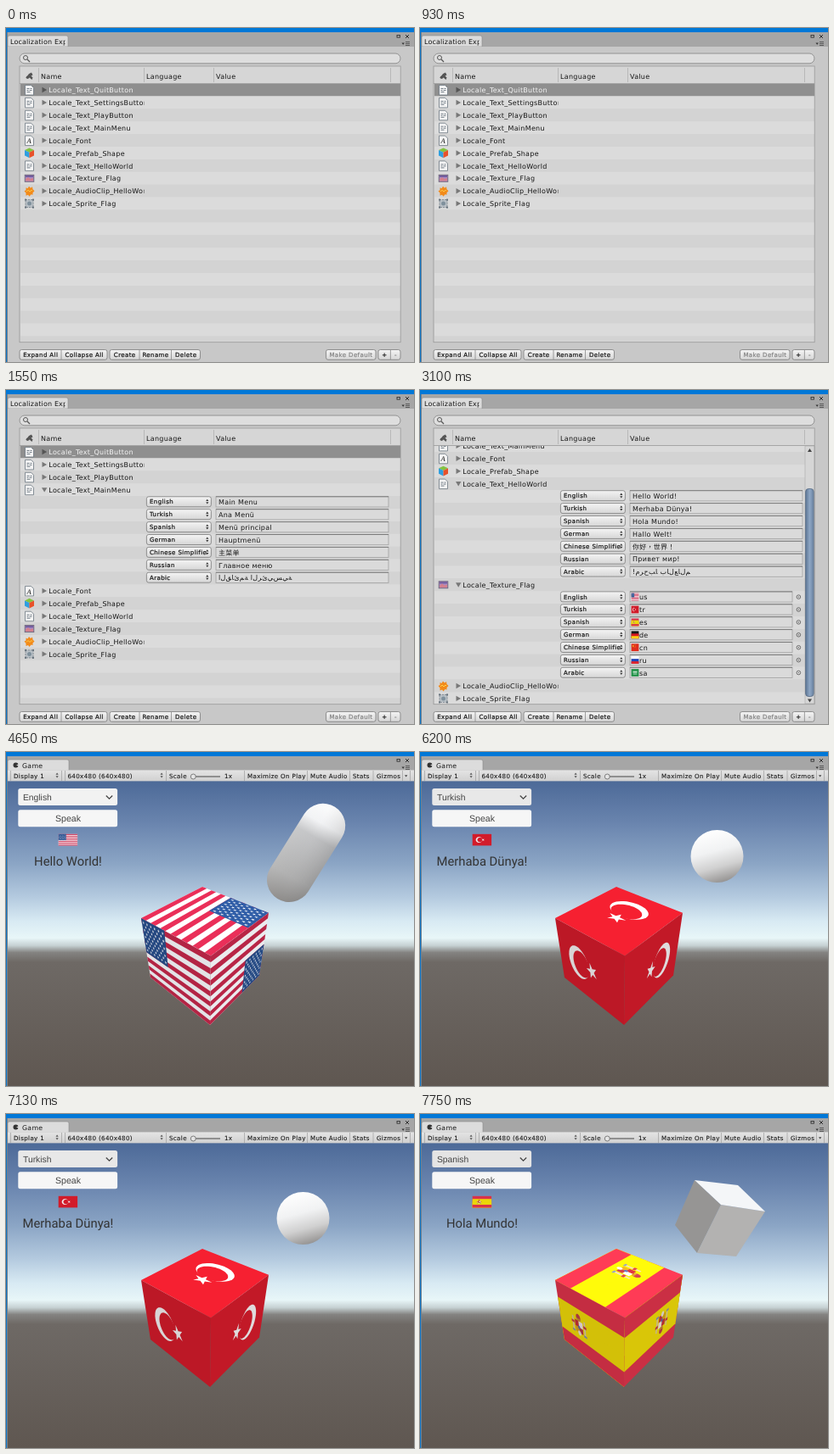
Animation, 480 px wide and 394 px high, one loop 9300 ms. Source, as an HTML page:

```html
<!DOCTYPE html>
<html lang="en">
<head>
<meta charset="utf-8">
<title>Localization</title>
<style>
html, body { margin: 0; width: 100%; height: 100%; overflow: hidden; background: #c6c6c6; }
svg { display: block; }
text { font-family: "DejaVu Sans", "Noto Sans CJK TC", "Noto Sans CJK", sans-serif; fill: #161616; letter-spacing: .28px; text-rendering: geometricPrecision; white-space: pre; }
.mini { letter-spacing: .4px; stroke: #161616; stroke-width: .22px; }
.off { fill: #858585; stroke: #858585; }
.bar { letter-spacing: .36px; stroke: #161616; stroke-width: .1px; }
.ui { font-family: "Liberation Sans", Arial, sans-serif; fill: #444; letter-spacing: 0; }
.big { font-family: Roboto, sans-serif; fill: #333; letter-spacing: 0; }
.ltr { direction: ltr; unicode-bidi: bidi-override; }
</style>
</head>
<body>
<svg id="stage" width="480" height="394" viewBox="0 0 480 394">
<defs>
  <linearGradient id="btn" x2="0" y2="1"><stop stop-color="#f4f4f4"/><stop offset="1" stop-color="#d6d6d6"/></linearGradient>
  <linearGradient id="bar" x2="0" y2="1"><stop stop-color="#e4e4e4"/><stop offset="1" stop-color="#d0d0d0"/></linearGradient>
  <linearGradient id="thumb"><stop stop-color="#5c7594"/><stop offset=".5" stop-color="#8ea6c4"/><stop offset="1" stop-color="#6b84a3"/></linearGradient>
  <linearGradient id="sky" gradientUnits="userSpaceOnUse" x1="0" y1="35" x2="0" y2="393">
    <stop stop-color="#4d6a98"/><stop offset=".13" stop-color="#6883ad"/><stop offset=".27" stop-color="#8ba5c5"/>
    <stop offset=".38" stop-color="#b4cadf"/><stop offset=".46" stop-color="#d8eaf3"/><stop offset=".515" stop-color="#e8f6f8"/>
    <stop offset=".54" stop-color="#c6d1d3"/><stop offset=".563" stop-color="#848381"/><stop offset=".595" stop-color="#6e6965"/>
    <stop offset="1" stop-color="#5f5751"/>
  </linearGradient>
  <linearGradient id="capLen" gradientUnits="userSpaceOnUse" x1="386" y1="62" x2="320" y2="176">
    <stop stop-color="#fdfdfd"/><stop offset=".2" stop-color="#f0f1f3"/><stop offset=".34" stop-color="#bcbdbf"/>
    <stop offset=".75" stop-color="#a6a6a6"/><stop offset="1" stop-color="#817f7d"/>
  </linearGradient>
  <linearGradient id="capSide" gradientUnits="userSpaceOnUse" x1="330" y1="106" x2="376" y2="132">
    <stop stop-color="#fff" stop-opacity=".2"/><stop offset=".45" stop-color="#fff" stop-opacity=".1"/>
    <stop offset="1" stop-color="#444" stop-opacity=".16"/>
  </linearGradient>
  <linearGradient id="ball" x1=".35" y1="0" x2=".62" y2="1">
    <stop stop-color="#fff"/><stop offset=".4" stop-color="#f1f2f3"/><stop offset=".7" stop-color="#d0d0d0"/><stop offset="1" stop-color="#939190"/>
  </linearGradient>
  <clipPath id="rows"><rect x="17" y="66" width="447" height="304"/></clipPath>
  <clipPath id="names"><rect x="17" y="66" width="145.5" height="304"/></clipPath>
  <clipPath id="tab"><rect x="2" y="8" width="67.6" height="14"/></clipPath>
</defs>
</svg>
<script>
const HOLD = 1550, ROW = 14.9;

const rect = (x, y, w, h, fill, more = '') =>
  `<rect x="${x}" y="${y}" width="${w}" height="${h}" fill="${fill}" ${more}/>`;
const text = (x, y, size, str, more = '') =>
  `<text x="${x}" y="${y}" font-size="${size}" ${more}>${str}</text>`;
const path = (d, fill, more = '') => `<path d="${d}" fill="${fill}" ${more}/>`;
const line = (d, color, w = 1) => path(d, 'none', `stroke="${color}" stroke-width="${w}"`);
const poly = (pts, fill, map = p => p) =>
  `<polygon points="${pts.map(p => map(p).map(n => n.toFixed(2)).join()).join(' ')}" fill="${fill}"/>`;
const mid = 'text-anchor="middle"';

// Flags in unit coordinates, placed through a mapping
const box = (u, v, w, h) => [[u, v], [u + w, v], [u + w, v + h], [u, v + h]];
const around = (n, u, v, radius, turn = 0) => Array.from({ length: n }, (_, i) => {
  const a = turn + i * 2 * Math.PI / n, r = radius(i);
  return [u + r * Math.cos(a) / 1.5, v + r * Math.sin(a)];
});
const disc = (u, v, r) => around(40, u, v, () => r);
const star = (u, v, r, turn = -Math.PI / 2) => around(10, u, v, i => i % 2 ? r * .382 : r, turn);
const bands = (...colors) => colors.map((c, i) => [box(0, i / colors.length, 1, 1 - i / colors.length), c]);

function usFlag() {
  const out = [[box(0, 0, 1, 1), '#f2f2f5']];
  for (let i = 0; i < 13; i += 2) out.push([box(0, i / 13, 1, 1 / 13), '#be2648']);
  out.push([box(0, 0, .4, 7 / 13), '#264c88']);
  for (let r = 0; r < 9; r++)
    for (let c = 0; c < 6 - r % 2; c++)
      out.push([star(.4 * (2 * c + 1 + r % 2) / 12, 7 / 13 * (r + 1) / 10, .028), '#f2f2f5']);
  return out;
}

const flags = {
  us: usFlag(),
  tr: [[box(0, 0, 1, 1), '#c81a28'], [disc(.345, .5, .25), '#e6e2e3'], [disc(.39, .5, .2), '#c81a28'],
    [star(.56, .5, .125, Math.PI), '#e6e2e3']],
  es: [...bands('#d03046', '#e0cc08', '#e0cc08', '#d03046'),
    [box(.24, .4, .025, .22), '#c9b9a0'], [box(.435, .4, .025, .22), '#c9b9a0'],
    [box(.225, .47, .05, .04), '#b83840'], [box(.425, .47, .05, .04), '#b83840'],
    [box(.225, .62, .05, .03), '#7b83a8'], [box(.425, .62, .05, .03), '#7b83a8'],
    [disc(.35, .385, .055), '#b03a42'], [box(.315, .4, .07, .03), '#b98a28'],
    [box(.285, .44, .065, .1), '#b82d36'], [box(.35, .44, .065, .1), '#dfd2d4'],
    [box(.285, .54, .065, .09), '#c8961c'], [box(.35, .54, .065, .09), '#b0343e'],
    [disc(.35, .635, .04), '#d8cfc8'], [disc(.35, .54, .028), '#5560a0']],
  de: bands('#151515', '#d0151c', '#f0c810'),
  cn: [[box(0, 0, 1, 1), '#d42a1c'], [star(.25, .32, .2), '#f0d020'], [disc(.5, .15, .05), '#f0d020'],
    [disc(.58, .32, .05), '#f0d020'], [disc(.5, .5, .05), '#f0d020']],
  ru: bands('#f6f6f6', '#1c40b0', '#d0242c'),
  sa: [[box(0, 0, 1, 1), '#1f8a45'], [box(.22, .3, .56, .2), '#b9dcc4'], [box(.25, .63, .5, .08), '#e4f2e8']]
};
const lit = (hex, light) => `rgb(${hex.match(/\w\w/g).map(c => Math.min(255, Math.round(parseInt(c, 16) * light)))})`;
const flag = (code, map, light = 1.05) =>
  flags[code].map(([pts, fill]) => poly(pts, lit(fill, light), map)).join('');
const flat = (x, y, w, h) => ([u, v]) => [x + u * w, y + v * h];

// Projective map from the unit square to four corners
function project([[x0, y0], [x1, y1], [x2, y2], [x3, y3]]) {
  const ax = x1 - x2, ay = y1 - y2, bx = x3 - x2, by = y3 - y2;
  const sx = x0 - x1 + x2 - x3, sy = y0 - y1 + y2 - y3, det = ax * by - bx * ay;
  const g = (sx * by - bx * sy) / det, h = (ax * sy - sx * ay) / det;
  return ([u, v]) => {
    const w = g * u + h * v + 1;
    return [((x1 - x0 + g * x1) * u + (x3 - x0 + h * x3) * v + x0) / w,
            ((y1 - y0 + g * y1) * u + (y3 - y0 + h * y3) * v + y0) / w];
  };
}

// Editor window
const frame = () =>
  rect(0, 0, 480, 394, '#c6c6c6') + rect(0, 0, 480, 22, '#a6a6a6') +
  rect(0, 0, 480, 5, '#0078d7') + rect(0, 5, 1, 389, '#0f74c4') + rect(1, 5, 1, 389, '#71818f') +
  rect(460, 8.5, 3.4, 2.6, 'none', 'stroke="#333" stroke-width=".9"') +
  line('M470 8l4 4m0-4l-4 4', '#333') + path('M465.5 17.5h3.4l-1.7 2.2z', '#333') +
  line('M470 16.5h5m-5 2h5m-5 2h5', '#444', .8);
const tabShape = w => path(`M2 22V11q0-2 2-2h${w - 5}q2 0 2 2v11z`, '#dcdcdc', 'stroke="#8a8a8a" stroke-width=".6"');

// Joined buttons: [label, width] pairs in one rounded frame
function buttons(x, list) {
  const width = list.reduce((sum, [, w]) => sum + w, 0);
  let out = rect(x, 379.5, width, 11.8, 'url(#btn)', 'rx="2.4" stroke="#7c7c7c" stroke-width=".8"');
  list.forEach(([label, w, off], i) => {
    if (i) out += line(`M${x} 380v11`, '#8a8a8a', .8);
    out += text(x + w / 2 + .2, 388, 7, label, `class="mini ${off ? 'off' : ''}" ${mid}`);
    x += w;
  });
  return out;
}

const page = (x, y) => path(`M${x} ${y - 5.5}h7l3 3v8.5h-10z`, '#f4f4f4', 'stroke="#6b7680" stroke-width=".8"');
const icons = {
  text: y => page(22.5, y) + line(`M24.5 ${y - 1.5}h3m1 0h2m-6 2h2m1 0h3m-6 2h4`, '#66717c', .9),
  font: y => page(22.5, y) + text(27.3, y + 3.6, 8.5, 'A', `${mid} style="font-family:'Liberation Serif',serif;font-style:italic"`),
  prefab: y => path(`M27.5 ${y - 6}l5.5 2.6-5.5 2.6-5.5-2.6z`, '#83c341') +
    path(`M22 ${y - 3.4}l5.5 2.6v6.6l-5.5-2.8z`, '#2f9fe0') + path(`M33 ${y - 3.4}l-5.5 2.6v6.6l5.5-2.8z`, '#e8512a'),
  image: y => rect(22.2, y - 4, 10.6, 8, '#a98bc6', 'stroke="#6d6579" stroke-width=".9"') +
    rect(23, y - 3.4, 9, 2, '#6f5a9c') + path(`M23 ${y + 3.3}v-2.6l3-2 3 2 2-1 1 .6v3z`, '#d2808f'),
  audio: y => path(`M21.5 ${y}l2-1v-3l2 1 1.5-2.5 2 2 2-1.5.5 3 2 2-2 2v2.5l-2-.5-2 2.5-1.5-2-2.5 1v-3z`, '#f28a1a') +
    line(`M24 ${y + 1}l2-2 2 2 2-2 1 1`, '#ffd34d'),
  sprite: y => rect(23, y - 4.5, 9, 9, '#b9c0c6', 'stroke="#6d7882" stroke-width=".8" stroke-dasharray="2 1"') +
    `<circle cx="27.5" cy="${y}" r="2.5" fill="#7f909c"/>` +
    [[22, -5.5], [31, -5.5], [22, 3.5], [31, 3.5]].map(([x, d]) => rect(x, y + d, 2, 2, '#69747e')).join('')
};

const langs = ['English', 'Turkish', 'Spanish', 'German', 'Chinese Simplifie', 'Russian', 'Arabic'];
const loose = s => [...s].join('\u200c');
const menu = ['Main Menu', 'Ana Menü', 'Menü principal', 'Hauptmenü', '主菜单', 'Главное меню', loose('القائمة الرئيسية')];
const hello = ['Hello World!', 'Merhaba Dünya!', 'Hola Mundo!', 'Hallo Welt!', '你好，世界！', 'Привет мир!', loose('!مرحبا بالعالم')];
const codes = ['us', 'tr', 'es', 'de', 'cn', 'ru', 'sa'];
const items = [
  ['text', 'Text_QuitButton'], ['text', 'Text_SettingsButton'], ['text', 'Text_PlayButton'],
  ['text', 'Text_MainMenu', menu], ['font', 'Font'], ['prefab', 'Prefab_Shape'],
  ['text', 'Text_HelloWorld', hello], ['image', 'Texture_Flag', codes],
  ['audio', 'AudioClip_HelloWorld'], ['sprite', 'Sprite_Flag']
];

function entry(y, lang, value, isFlag) {
  const top = y - 6.2, w = isFlag ? 191 : 203;
  return rect(165.4, top, 76, 12, 'url(#btn)', 'rx="2.5" stroke="#7c7c7c" stroke-width=".8"') +
    text(169, y + 2.4, 7, lang, 'class="mini"') +
    path(`M235.2 ${y - 1}h3.2l-1.6-2.3zm0 1.3h3.2l-1.6 2.3z`, '#333') +
    rect(247, top, w, 12.2, '#dadada', 'stroke="#a0a0a0" stroke-width=".8"') +
    line(`M247 ${top}h${w}`, '#777', .9) +
    (isFlag
      ? flag(value, flat(248.6, y - 4.4, 8.8, 8.8)) +
        `<circle cx="445.4" cy="${y}" r="2.3" fill="none" stroke="#555" stroke-width=".8"/><circle cx="445.4" cy="${y}" r=".6" fill="#444"/>`
      : '') +
    text(isFlag ? 258 : 250, y + 3, 8, value, 'class="ltr" lang="zh-Hant"');
}

function tree(open, shift) {
  let n = 0, names = '', cells = '', stripes = '';
  const next = () => 73 + ROW * n++ - shift;
  for (const [kind, name, values] of items) {
    const y = next(), chosen = n === 1, isOpen = open.includes(name);
    names += icons[kind](y) +
      path(isOpen ? `M42 ${y - 2.5}h6.4l-3.2 5.4z` : `M42.5 ${y - 3.2}v6.4l5.6-3.2z`, chosen ? '#555' : '#787878') +
      text(50.3, y + 3.1, 8, 'Locale_' + name, chosen ? 'style="fill:#f4f4f4"' : '');
    if (isOpen) values.forEach((v, i) => { cells += entry(next() - .6, langs[i], v, values === codes); });
  }
  for (let i = 0; i < 25; i++)
    stripes += rect(17, 65.5 + ROW * i - shift, 447, ROW + .1, i ? (i % 2 ? '#dbdbdb' : '#d3d3d3') : '#8f8f8f');
  return `<g clip-path="url(#rows)">${stripes}${cells}</g><g clip-path="url(#names)">${names}</g>`;
}

const scrollbar = () =>
  rect(453, 66, 11, 304, '#d6d6d6', 'stroke="#a8a8a8" stroke-width=".6"') +
  rect(453.6, 116.5, 9.6, 245, 'url(#thumb)', 'rx="3.5" stroke="#566a82" stroke-width=".8"') +
  path('M456 73h5l-2.5-4z', '#444') + path('M456 364.5h5l-2.5 4z', '#444');

const explorer = (open = [], shift = 0) =>
  frame() + tabShape(72) + rect(2, 22, 478, 372, '#c8c8c8') +
  `<g clip-path="url(#tab)">${text(5, 18.8, 8, 'Localization Explorer', 'style="letter-spacing:.15px"')}</g>` +
  rect(16, 30, 448, 11.8, '#dedede', 'rx="5.9" stroke="#8c8c8c" stroke-width=".9"') +
  '<circle cx="23" cy="35" r="2.5" fill="none" stroke="#555"/>' + line('M25 37l3 3', '#555', 1.2) +
  rect(16, 45, 448.5, 326, '#d6d6d6') + tree(open, shift) +
  rect(16, 45, 448, 20.4, '#d6d6d6') + line('M16 65.5h448', '#999', .8) +
  line('M38.5 47v17M162.5 47v17M244.5 47v17M452.5 47v17', '#b0b0b0', .8) +
  path('M24 58l3-4 3-1.5 1.5 3-2 1 2 2-1 2.5-3-2.5z', '#555') + '<circle cx="25.4" cy="58.2" r="1.8" fill="#555"/>' +
  text(41, 60.3, 8, 'Name') + text(165, 60.3, 8, 'Language') + text(247, 60.3, 8, 'Value') +
  (shift ? scrollbar() : '') +
  rect(16, 45, 448.2, 325.7, 'none', 'stroke="#979797" stroke-width=".8"') +
  buttons(16, [['Expand All', 49], ['Collapse All', 54]]) +
  buttons(122, [['Create', 35], ['Rename', 37.5], ['Delete', 34]]) +
  buttons(376.5, [['Make Default', 58.5, true]]) + buttons(438, [['+', 14.4], ['-', 11.6, true]]);

// Game view
const updown = x => path(`M${x} 26.8h3.2l-1.6-2.3zm0 1.5h3.2l-1.6 2.3z`, '#555');
const label = (x, str) => text(x, 30.6, 7.1, str, 'class="bar"');
const toolbar = () =>
  tabShape(73) + '<circle cx="11.5" cy="15.5" r="3" fill="#333"/>' + path('M12 15.5l3.5-1.6v3.2z', '#dcdcdc') +
  text(19, 18.8, 7.8, 'Game') + rect(2, 21.4, 478, 13, 'url(#bar)') +
  line('M5.5 22v12M65.5 22v12M69.5 22v12M188.5 22v12M280.5 22v12M354.5 22v12M404.5 22v12M432 22v12M466.5 22v12M475.5 22v12', '#a6a6a6', .8) +
  label(9, 'Display 1') + updown(58.5) + label(72.5, '640x480 (640x480)') + updown(181.5) +
  label(192, 'Scale') + line('M219 29h33', '#777', 1.3) +
  '<circle cx="220.3" cy="29" r="3" fill="#e4e4e4" stroke="#666" stroke-width=".8"/>' + label(257, '1x') +
  label(284, 'Maximize On Play') + label(358, 'Mute Audio') + label(408, 'Stats') +
  label(436, 'Gizmos') + path('M469 27.2h3.4l-1.7 2.4z', '#444');

const A = [159, 196], B = [231, 159], C = [309, 189.7], D = [241, 240.5],
      E = [240, 322], F = [170, 266], G = [298, 263.5];
const faces = [[[C, D, A, B], 1.23], [[A, D, E, F], .94], [[G, E, D, C], .97]];
const cube = code => faces.map(([corners, light]) => flag(code, project(corners), light)).join('');

const capsule = ['capLen', 'capSide'].map(id =>
  path('M373 87L333.2 150.8', 'none', `stroke="url(#${id})" stroke-width="52.4" stroke-linecap="round"`)).join('');
const ball = '<circle cx="349.5" cy="123" r="31" fill="url(#ball)"/>';
const block = poly([[323, 78], [354, 107], [326, 164], [300, 131]], '#969594') +
  poly([[354, 107], [406, 115], [372, 168], [326, 164]], '#b3b2b1') +
  poly([[323, 78], [374, 84], [406, 115], [354, 107]], '#f4f6f8');

const game = (lang, code, greeting, shape, fill) =>
  frame() + toolbar() + rect(2, 34.4, 478, 359.6, 'url(#sky)') +
  rect(14.3, 43, 116.8, 20, fill, 'rx="2.5"') + text(20, 57, 10.3, lang, 'class="ui"') +
  line('M117.8 51.5l3.7 3.6 3.7-3.6', '#444', 1.3) +
  rect(14.3, 68.2, 116.8, 20, '#f6f6f6', 'rx="2.5"') + text(73, 82, 10.6, 'Speak', `class="ui" ${mid}`) +
  flag(code, flat(61.7, 96.8, 22.4, 13.6)) + text(73, 134, 14.8, greeting, `class="big" ${mid}`) +
  shape + cube(code);

const scenes = [
  explorer(),
  explorer(['Text_MainMenu']),
  explorer(['Text_HelloWorld', 'Texture_Flag'], 51.8),
  game('English', 'us', hello[0], capsule, '#f2f2f2'),
  game('Turkish', 'tr', hello[1], ball, '#e8e8e8'),
  game('Spanish', 'es', hello[2], block, '#e4e4e4')
];

const stage = document.getElementById('stage');
stage.insertAdjacentHTML('beforeend', scenes.map(s => `<g class="scene" display="none">${s}</g>`).join(''));
const layers = stage.querySelectorAll('.scene');
const start = performance.now();
let shown = -1;

function draw() {
  const now = Math.floor((performance.now() - start) / HOLD) % scenes.length;
  if (now !== shown) {
    layers.forEach((g, i) => g.setAttribute('display', i === now ? 'inline' : 'none'));
    shown = now;
  }
  requestAnimationFrame(draw);
}
draw();
</script>
</body>
</html>
```
